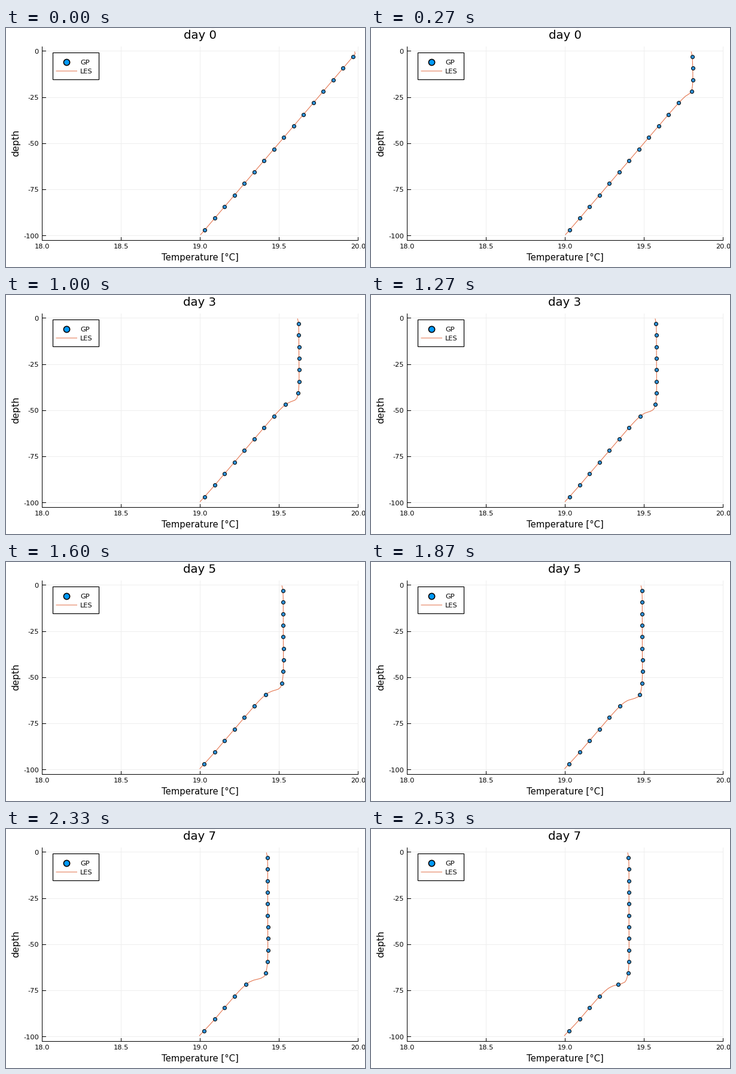
A matplotlib script that plays this animation: 600 px wide and 400 px high, repeating every 2590 ms.

```python
import numpy as np
import matplotlib.pyplot as plt
from matplotlib.animation import FuncAnimation
from matplotlib.patches import Rectangle

W, H, DPI = 600, 400, 100
PX = 72 / DPI  # points per pixel
LEFT, RIGHT, TOP, BOTTOM = 60, 588, 31, 355
BLUE, DOT_BLUE, ORANGE, GRID = "#009afa", "#2f90d6", "#e36f47", "#eeeeee"

TICK_MS, LOOP_MS = 10, 2590
DAYS_PER_STEP = 0.209

plt.rcParams["font.family"] = "DejaVu Sans"
fig = plt.figure(figsize=(W / DPI, H / DPI), dpi=DPI, facecolor="white")
ax = fig.add_axes([0, 0, 1, 1])
ax.set_xlim(0, W)
ax.set_ylim(H, 0)
ax.axis("off")


def to_x(temp):
    return LEFT + (temp - 18) * 264


def to_y(z):
    return 38.4 - 3.09 * z


def line(x, y, color="black", width=1.0, **kw):
    return ax.plot(x, y, color=color, lw=width * PX, **kw)[0]


def label(x, y, text, size, ha="center", **kw):
    return ax.text(x, y, text, fontsize=size * PX, ha=ha, va="baseline", **kw)


def dots(x, y, size, fill, edge, **kw):
    return ax.plot(x, y, "o", ms=size * PX, mfc=fill, mec="black",
                   mew=edge * PX, **kw)[0]


def temperature(z, step):
    """Linear stratification topped by a deepening, cooling mixed layer."""
    temp = 20 + z / 100
    if step == 0:
        return temp - 0.04 * np.exp(z / 0.5)
    drop = 0.0964 * np.sqrt(step)
    u = z + 120.7 * drop  # height above the entrainment zone
    arg = 1.15 * np.tanh(u) + u * np.where(u > 0, 0.18, 0.5)
    temp = temp + (20 - drop - temp) / (1 + np.exp(-arg))
    surface = 0.010 * np.exp(z / 2.2)
    floor = 0.008 * step / 38 * np.exp(-((z + 100) / 5) ** 2)
    return temp - surface - floor


# axes, grid and tick labels
x_ticks = np.linspace(18, 20, 5)
z_ticks = range(0, -101, -25)
for t in x_ticks:
    line([to_x(t)] * 2, [TOP, BOTTOM], GRID, zorder=1)
for z in z_ticks:
    line([LEFT, RIGHT], [to_y(z)] * 2, GRID, zorder=1)
for t in x_ticks:
    line([to_x(t)] * 2, [BOTTOM - 5, BOTTOM], zorder=2)
    label(to_x(t) + 0.5, 369, f"{t:.1f}", 11.4)
for z in z_ticks:
    line([LEFT, LEFT + 5.5], [to_y(z)] * 2, zorder=2)
    label(55, to_y(z) + 4.2, str(z), 11.4, ha="right")
line([LEFT, LEFT], [TOP, BOTTOM], zorder=2)
line([LEFT, RIGHT], [BOTTOM, BOTTOM], zorder=2)
label(324, 389, "Temperature [°C]", 14.9)
label(21, 192, "depth", 15.5, rotation=90, rotation_mode="anchor")
title = label(324, 18, "", 19.8)

# legend
ax.add_patch(Rectangle((78, 41), 77, 45, fc="white", ec="black",
                       lw=1.2 * PX, zorder=5))
dots([101.2], [56.5], 10.2, BLUE, 1.6, zorder=6)
line([84, 118.5], [72, 72], ORANGE, zorder=6, snap=False)
label(124, 61, "GP", 11.4, ha="left", zorder=6)
label(124, 76, "LES", 11.4, ha="left", zorder=6)

# profiles
z_les = -(np.arange(100) + 0.5)
z_gp = -(np.arange(16) + 0.5) * 100 / 16
les = line([], [], ORANGE, 1.05, zorder=3, snap=False)
gp = dots([], [], 6.0, DOT_BLUE, 1.0, zorder=4, snap=False)


def update(tick):
    step = 3 * (2 * tick + 1) // 40  # 15 steps per second
    les.set_data(to_x(temperature(z_les, step)), to_y(z_les))
    gp.set_data(to_x(temperature(z_gp, step)), to_y(z_gp))
    title.set_text(f"day {int(step * DAYS_PER_STEP)}")
    return les, gp, title


anim = FuncAnimation(fig, update, frames=LOOP_MS // TICK_MS, interval=TICK_MS,
                     init_func=lambda: update(0), repeat=True, repeat_delay=0)
plt.show()
```
